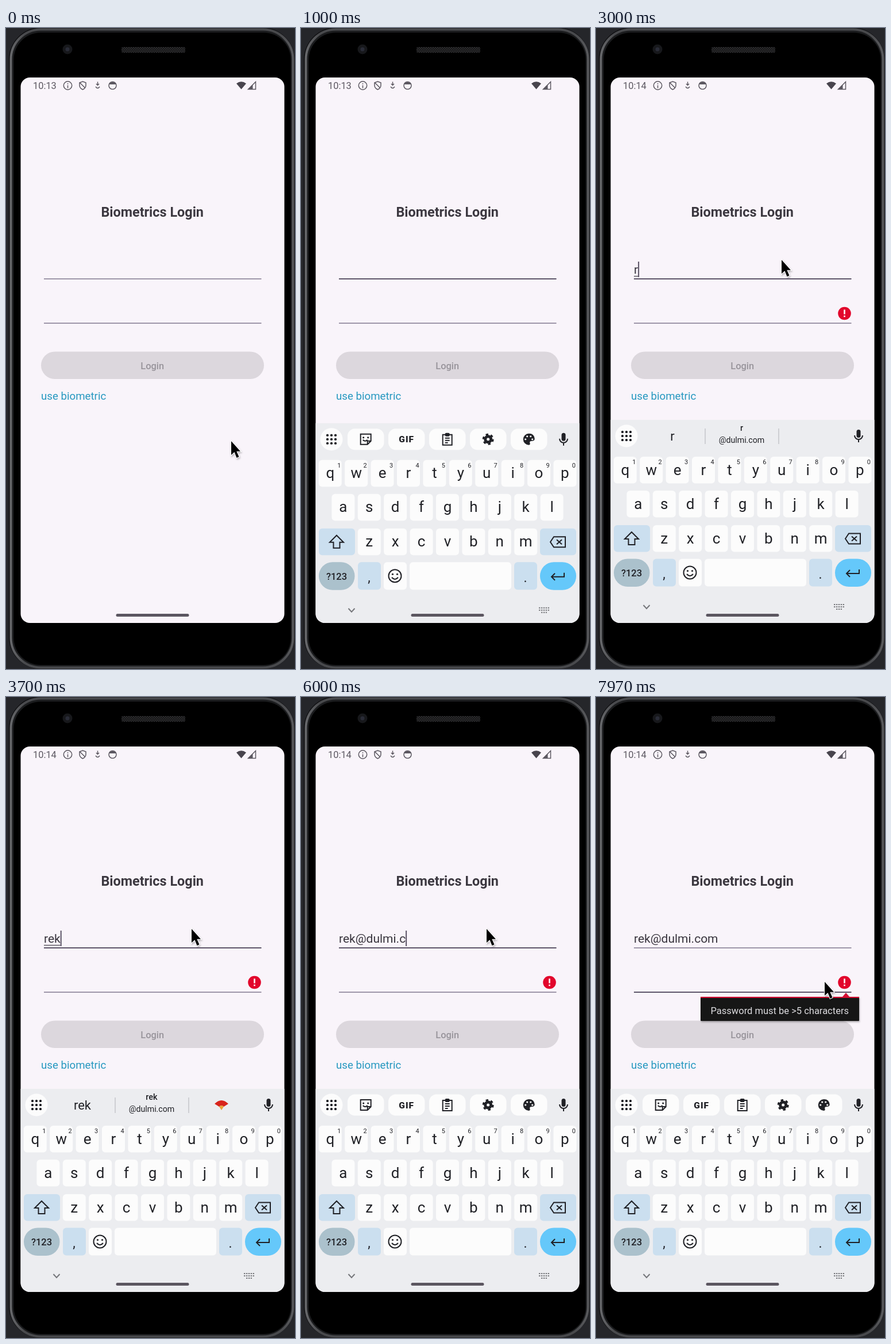
Animation, 503 px wide and 1114 px high, one loop 8000 ms. Source, as an HTML page:

```html
<!DOCTYPE html>
<html lang="en">
<head>
<meta charset="utf-8">
<title>Biometrics Login</title>
<style>
  html, body { margin: 0; width: 100%; height: 100%; overflow: hidden; background: #25262a; }
  svg { display: block; width: 503px; height: 1114px; font-family: Roboto, sans-serif; }
  .mid { text-anchor: middle; }
  .line { fill: none; stroke: currentColor; stroke-width: 2; }
  .thin { stroke-width: 1.5; }
  .ink { color: #202126; fill: #202126; }
  .field { font-size: 21px; fill: #38343d; }
</style>
</head>
<body>
<svg viewBox="0 0 503 1114">
  <defs>
    <clipPath id="screen"><rect x="25.5" y="86" width="459" height="948" rx="16"/></clipPath>
    <linearGradient id="rim">
      <stop offset="0" stop-color="#66676a"/><stop offset=".05" stop-color="#48494c"/>
      <stop offset=".95" stop-color="#48494c"/><stop offset="1" stop-color="#58595c"/>
    </linearGradient>
    <pattern id="mesh" width="4" height="4" patternUnits="userSpaceOnUse">
      <path d="M0 4L4 0M0 0L4 4" stroke="#2c2c2e" stroke-width="1"/>
    </pattern>
    <filter id="shadow" x="-50%" y="-50%" width="200%" height="200%">
      <feDropShadow dx="1" dy="2" stdDeviation="1.5" flood-opacity=".3"/>
    </filter>
    <g id="error">
      <circle r="11.3" fill="#e2062c"/>
      <path d="M0 -6.5V1.5M0 3.8V6.3" stroke="#fff" stroke-width="2.6"/>
    </g>
  </defs>

  <rect x="5" y="-1" width="497" height="1115" rx="56" fill="#0c0c0e"/>
  <rect x="8.5" y="2.5" width="491" height="1109" rx="52" fill="#1b1c1e" stroke="url(#rim)" stroke-width="4"/>
  <rect x="13.5" y="8" width="482" height="1099" rx="47" fill="#000"/>
  <circle cx="107" cy="37" r="8.5" fill="#17181b"/><circle cx="107" cy="37" r="3.5" fill="#292b37"/>
  <rect x="201" y="33" width="111" height="10" rx="3" fill="#141415"/>
  <rect x="201" y="33" width="111" height="10" rx="3" fill="url(#mesh)"/>

  <g clip-path="url(#screen)">
    <rect x="25" y="86" width="460" height="948" fill="#f9f4fa"/>
    <g color="#5c5861" fill="#5c5861">
      <text id="clock" x="47" y="106.3" font-size="16.4"></text>
      <g class="line thin">
        <circle cx="107.5" cy="100" r="7.2"/><path d="M107.5 96v1.8M107.5 99.5v5"/>
        <path d="M133.500 93l5.500 2v4.500q0 5-5.500 7.500q-5.500-2.500-5.500-7.500v-4.500zM129 95.500l9 9"/>
        <path d="M159.500 93.500v6M157 97l2.500 2.500 2.500-2.500M156 102q3.500 5 7 0"/>
        <circle cx="185.5" cy="100" r="6.5"/>
      </g>
      <path d="M179.500 98a6.500 6.500 0 0 1 12 0z"/>
      <path d="M401 96.500q8.500-6.500 17 0l-8.500 10z" fill="#48444d"/>
      <path d="M421.500 106.500h13v-13z" class="line thin"/>
      <path d="M421 107h8.500v-8.500z"/>
    </g>

    <text class="mid" x="254.7" y="327.7" font-size="23.4" font-weight="700" fill="#3c3840">Biometrics Login</text>
    <path id="userLine" d="M66 436H444.500"/>
    <path id="passLine" d="M66 513H444.500"/>
    <text id="user" class="field" x="66" y="427"></text>
    <path id="underline" stroke="#5c5861" stroke-width="1.3"/>
    <rect id="caret" width="2" height="27" fill="#5a5365"/>
    <use id="userError" href="#error" x="432.5" y="419"/>
    <use id="passError" href="#error" x="432.5" y="496"/>
    <rect x="61" y="562.5" width="388" height="47.5" rx="23.7" fill="#dcd7dd"/>
    <text class="mid" x="254.7" y="592.8" font-size="16.4" font-weight="500" fill="#98949b">Login</text>
    <text x="61" y="646" font-size="18.7" fill="#2698c0">use biometric</text>

    <g id="keyboard" class="ink"></g>
    <rect x="191.5" y="1018" width="127" height="5" rx="2.5" fill="#5b5660"/>
  </g>

  <g id="tips"></g>
  <path id="pointer" d="M0 0V24L5.500 19L9.500 29L13.500 27.200L9.300 17.800H16Z" fill="#000" stroke="#fff"
    stroke-width="2" paint-order="stroke" filter="url(#shadow)"/>
</svg>

<script>
const LOOP = 8000;
const $ = id => document.getElementById(id);
const show = (id, on) => $(id).style.display = on ? '' : 'none';
const clamp = x => Math.min(1, Math.max(0, x));
const progress = (t, from, to) => clamp((t - from) / (to - from));
const smooth = x => x * x * (3 - 2 * x);

const ADDRESS = 'rek@dulmi.com';
const NAME = ADDRESS.split('@')[0];
const HOST = ADDRESS.slice(NAME.length);
const KEY_TIMES = [2730, 3030, 3330, 4230, 4560, 4760, 4960, 5130, 5300, 5600, 5870, 6170, 6330];
const FOCUS_USER = 500, FOCUS_PASS = 7400, PITCH = 45.4;

const box = (x, y, w, h, fill = '#fcfcfc', r = 6) =>
  `<rect x="${x}" y="${y}" width="${w}" height="${h}" rx="${r}" fill="${fill}"/>`;
const label = (x, y, size, text, extra = '') =>
  `<text class="mid" x="${x}" y="${y}" font-size="${size}" ${extra}>${text}</text>`;
const icon = (x, y, body) => `<g transform="translate(${x} ${y})">${body}</g>`;
const line = d => `<path class="line" d="${d}"/>`;

function letterRow(letters, x0, y, digits = '') {
  return [...letters].map((c, i) => {
    const x = x0 + i * PITCH;
    return box(x - 20, y - 23, 40, 46.5) + label(x, y + 8.5, 26, c) +
      (digits ? label(x + 15.5, y - 10, 11, digits[i]) : '');
  }).join('');
}

function buildKeyboard() {
  const dots = [-7, 0, 7].flatMap(x => [-7, 0, 7].map(y => box(x - 2, y - 2, 4, 4, '#202126', 1.5))).join('');
  const eyes = '<circle cx="-4" cy="-3" r="1.6"/><circle cx="4" cy="-3" r="1.6"/>';
  const tools = [
    line('M-9 -9H9V3L3 9H-9ZM9 3H3V9M-5 1Q-1 5 3 1') + eyes,
    label(0, 5.5, 15.5, 'GIF', 'font-weight="900" letter-spacing="1"'),
    line('M-8 -8H8V10H-8ZM-4 -2H4M-4 2H4M-4 6H1') + box(-4, -11, 8, 6, '#202126', 2),
    '<circle class="line" r="5" style="stroke-width:5"/><circle class="line" r="8.3" style="stroke-width:3.4" stroke-dasharray="4.35"/>',
    '<path d="M0 -10A10 10 0 1 0 0 10Q3 9 1.5 6Q1 3 5 3Q10 3 10 -1Q9 -10 0 -10Z"/>' +
      [[-6, 0], [-3, -5], [3, -5], [6, 0]].map(([x, y]) => `<circle cx="${x}" cy="${y}" r="1.6" fill="#fff"/>`).join('')
  ];
  const tint = '#cbdfef';
  return box(25, 681, 460, 360, '#ecedf0', 0) +
    '<circle cx="53" cy="709" r="19.5" fill="#fcfcfc"/>' + icon(53, 709, dots) +
    `<g id="tools">${tools.map((t, i) => box(81 + i * 71, 690.5, 63.5, 37, '#fcfcfc', 13) + icon(112.7 + i * 71, 709, t)).join('')}</g>` +
    `<g id="suggest"><path d="M190 696V723M318 696V723" stroke="#c5c6ca" stroke-width="1.5"/>
      <text class="mid word" x="133" y="717" font-size="22"></text>
      <text class="mid word" x="253.5" y="700" font-size="14.5" font-weight="500"></text>
      ${label(253.5, 720.5, 14.2, HOST)}
      <g id="handFan" transform="translate(375 711)"><path d="M-12 -4Q0 -16 12 -4L4 1Q0 -3 -4 1Z" fill="#d8251c"/>
        <path d="M-4 1Q0 -3 4 1L0 7Z" fill="#e9a33b"/></g></g>` +
    icon(457, 709, box(-3.5, -11, 7, 14, '#202126', 3.5) + line('M-7 -1A7 7 0 0 0 7 -1M0 6V11')) +
    letterRow('qwertyuiop', 50.8, 768, '1234567890') +
    letterRow('asdfghjkl', 73.4, 827) +
    letterRow('zxcvbnm', 118.8, 887) +
    box(31, 864, 63, 46.5, tint) + icon(62, 887, line('M0 -11L12 1H5.500V11H-5.500V1H-12Z')) +
    box(416, 864, 63, 46.5, tint) + icon(447, 887.5, line('M-13 0L-7 -9H13V9H-7ZM-2 -4L7 4M7 -4L-2 4')) +
    box(31, 922.5, 62.5, 48.5, '#abc1cc', 24) + label(62, 953, 16.5, '?123', 'font-weight="500"') +
    box(99, 922.5, 40, 48, tint) + label(118.5, 957, 23, ',') +
    box(144, 922.5, 40, 48) + icon(163.5, 946.5, '<circle class="line" r="11"/>' + eyes + line('M-5.500 2.500Q0 9 5.500 2.500')) +
    box(189, 922.5, 177, 48) +
    box(371, 922.5, 40, 48, tint) + label(390.5, 957, 23, '.') +
    box(416, 922.5, 63, 48.5, '#65c8fa', 24) + icon(447, 947, line('M11 -6V1H-10M-5 -5L-11 1L-5 7')) +
    `<g color="#77787c">${icon(88, 1006, line('M-5.500 -3L0 3L5.500 -3'))}
      ${icon(423, 1006, '<path class="line" d="M-9 -4H9M-9 0H9M-5 4H5" stroke-dasharray="2.4 1.5"/>')}</g>`;
}

const tip = (id, x, y, text) => `<g id="${id}" filter="url(#shadow)">
  ${box(x, y, 458 - x, 42, '#161617', 1)}
  <path d="M${x} ${y}H429L435 ${y - 7}L441 ${y}H458V${y + 2}H${x}Z" fill="#d40d30"/>
  <text x="440" y="${y + 29.5}" text-anchor="end" font-size="16.5" fill="#dedde0">${text}</text></g>`;

$('keyboard').innerHTML = buildKeyboard();
$('tips').innerHTML = tip('userTip', 267, 445, 'Not a valid username') +
  tip('passTip', 182, 521, 'Password must be &gt;5 characters');

function styleLine(id, focused) {
  $(id).setAttribute('stroke', focused ? '#5d5569' : '#80778e');
  $(id).setAttribute('stroke-width', focused ? 2.2 : 1.6);
}

function fadeTip(id, t, from, to) {
  show(id, t >= from && t < to);
  $(id).style.opacity = progress(t, from, from + 120);
}

function render(t) {
  const count = KEY_TIMES.filter(k => t >= k).length;
  const typed = ADDRESS.slice(0, count);
  const onPass = t >= FOCUS_PASS;
  $('clock').textContent = t < 1600 ? '10:13' : '10:14';
  $('user').textContent = typed;
  styleLine('userLine', t >= FOCUS_USER && !onPass);
  styleLine('passLine', onPass);

  const width = count ? $('user').getComputedTextLength() : 0;
  const composing = count > 0 && count <= NAME.length;
  $('underline').setAttribute('d', `M66 431.5h${width}`);
  show('underline', composing);

  const blinkStart = onPass ? FOCUS_PASS : count ? KEY_TIMES[count - 1] : FOCUS_USER;
  show('caret', t >= blinkStart && (t - blinkStart) % 1000 < 500);
  $('caret').setAttribute('x', 66 + (onPass ? 0 : width));
  $('caret').setAttribute('y', onPass ? 483 : 406);

  const invalidFrom = KEY_TIMES[3], invalidTo = KEY_TIMES[10];
  show('userError', t >= invalidFrom && t < invalidTo);
  show('passError', count > 0);
  fadeTip('userTip', t, invalidFrom + 40, invalidTo);
  fadeTip('passTip', t, FOCUS_PASS + 80, LOOP);

  show('tools', !composing);
  show('suggest', composing);
  show('handFan', count === NAME.length);
  document.querySelectorAll('.word').forEach(w => w.textContent = typed);
  const drop = 353 * (1 - progress(t, 650, 1120)) ** 3;
  $('keyboard').setAttribute('transform', `translate(0 ${drop})`);

  const toUser = smooth(progress(t, 60, 480));
  const toPass = smooth(progress(t, 6600, 7300));
  const x = 392 - 69 * toUser + 75 * toPass;
  const y = 718 - 315 * toUser + 92 * toPass;
  $('pointer').setAttribute('transform', `translate(${x} ${y})`);
  show('pointer', t < 850 || t > 1400);
}

function tick() {
  render(performance.now() % LOOP);
  requestAnimationFrame(tick);
}
tick();
</script>
</body>
</html>
```
